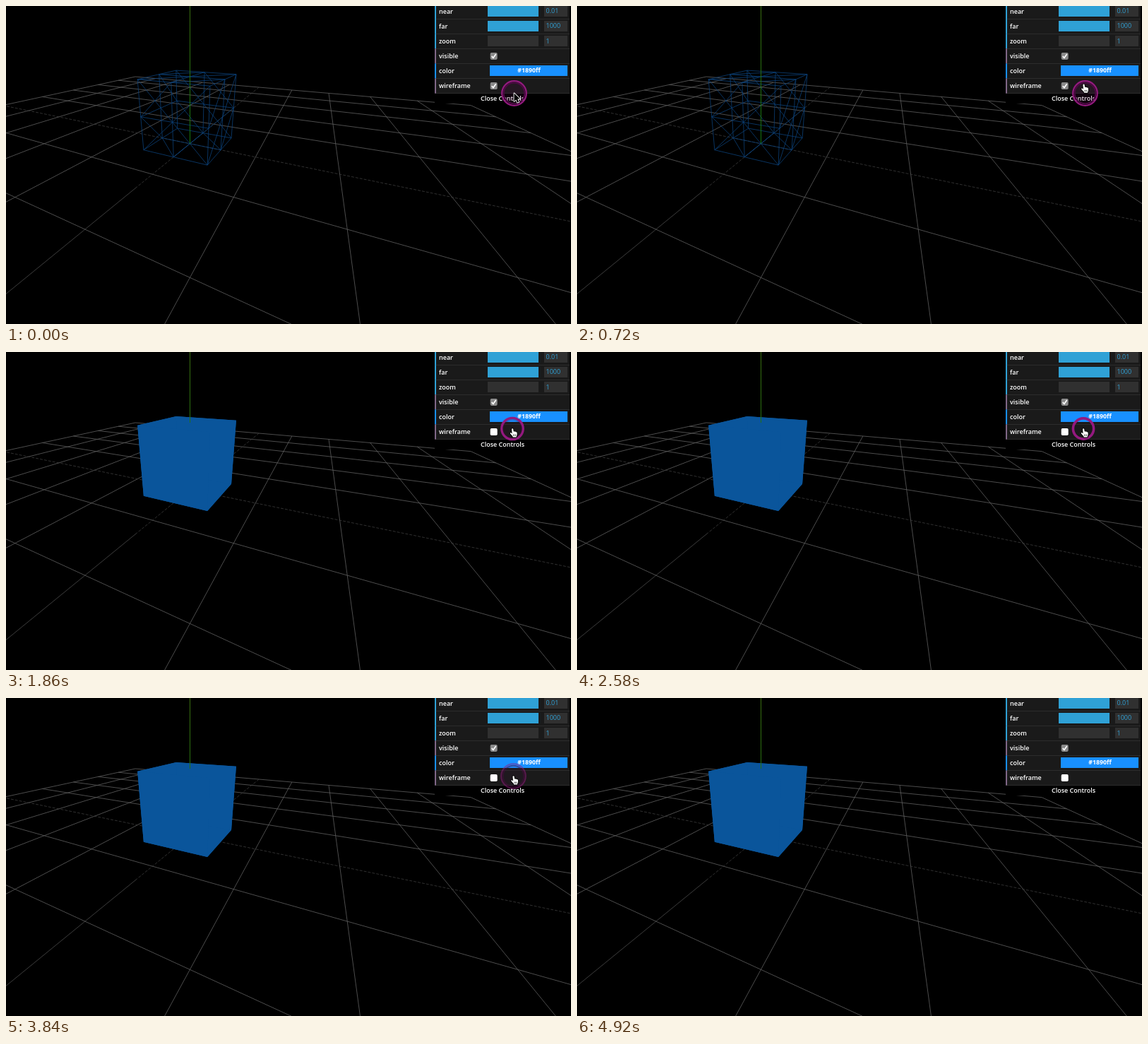
Write an HTML page with a canvas that moves like this. It is 800 by 450 pixels and loops after 5220 ms.

```html
<!DOCTYPE html>
<html lang="en">
<head>
<meta charset="utf-8">
<title>Wireframe toggle</title>
<style>
html, body { margin: 0; width: 100%; height: 100%; overflow: hidden; background: #000; }
canvas { display: block; width: 800px; height: 450px; }
</style>
</head>
<body>
<canvas id="stage" width="800" height="450"></canvas>
<script>
const ctx = document.getElementById('stage').getContext('2d');
const LOOP = 5220, STEP = 60;
const FONT = '"Open Sans", "Noto Sans", sans-serif';
const SIDES = [-1, 1];

// Camera at (1.5, 1.5, 3) looking at the world origin
const CAM = { x: 260.4, y: 194.8, f: 339, dist: 1.5 * Math.sqrt(6) };
const NEAR = 0.05;

const mix = (a, b, k) => a.map((v, i) => v + (b[i] - v) * k);

function ease(t, from, to) {
  const k = Math.min(1, Math.max(0, (t - from) / (to - from)));
  return k * k * (3 - 2 * k);
}

function toView([x, y, z]) {
  return [
    (2 * x - z) / Math.sqrt(5),
    (-x + 5 * y - 2 * z) / Math.sqrt(30),
    CAM.dist - (x + y + 2 * z) / Math.sqrt(6)
  ];
}

function toScreen([x, y, d]) {
  return [CAM.x + CAM.f * x / d, CAM.y - CAM.f * y / d];
}

const project = p => toScreen(toView(p));
const clip = (a, b) => mix(a, b, (NEAR - a[2]) / (b[2] - a[2]));

function addLine(p, q) {
  let a = toView(p), b = toView(q);
  if (a[2] < NEAR && b[2] < NEAR) return;
  if (a[2] < NEAR) a = clip(a, b);
  else if (b[2] < NEAR) b = clip(b, a);
  ctx.moveTo(...toScreen(a));
  ctx.lineTo(...toScreen(b));
}

function strokeLines(lines, color, dash = []) {
  ctx.strokeStyle = color;
  ctx.lineWidth = 0.8;
  ctx.setLineDash(dash);
  ctx.beginPath();
  lines.forEach(l => addLine(...l));
  ctx.stroke();
  ctx.setLineDash([]);
}

const gridLines = [];
for (let i = -5; i <= 5; i++) {
  if (i) gridLines.push([[i, 0, -5], [i, 0, 5]], [[-5, 0, i], [5, 0, i]]);
}

// Unit cube on the ground; w runs along the axis, u and v across it, all in -1..1
function cubePoint(axis, w, u, v) {
  const p = [];
  p[axis] = w / 2;
  p[(axis + 1) % 3] = u / 2;
  p[(axis + 2) % 3] = v / 2;
  p[1] += 0.5;
  return p;
}

// Edges and midlines, then one diagonal in each quarter of each face
const wire = [], faces = [];
for (let axis = 0; axis < 3; axis++) {
  for (let u = -1; u <= 1; u++) {
    for (let v = -1; v <= 1; v++) {
      if (u || v) wire.push(SIDES.map(w => cubePoint(axis, w, u, v)));
    }
  }
  for (const side of SIDES) {
    const slope = axis === 2 ? side : -side;
    for (const u of SIDES) {
      for (const v of SIDES) {
        const ends = u * v === slope ? [[0, 0], [u, v]] : [[u, 0], [0, v]];
        wire.push(ends.map(e => cubePoint(axis, side, ...e)));
      }
    }
    faces.push([[-1, -1], [1, -1], [1, 1], [-1, 1]].map(c => project(cubePoint(axis, side, ...c))));
  }
}

function drawScene(solid) {
  strokeLines(gridLines, '#606060');
  strokeLines([[[-5, 0, 0], [5, 0, 0]], [[0, 0, -5], [0, 0, 1.3]]], '#3c3c3c', [4, 2]);
  strokeLines([[[0, 0, 1.3], [0, 0, 5]]], '#4c4c4c');

  if (solid) {
    ctx.fillStyle = '#0a559b';
    for (const face of faces) {
      ctx.beginPath();
      face.forEach(p => ctx.lineTo(...p));
      ctx.fill();
    }
  } else {
    strokeLines(wire, '#0c4078');
  }
  const base = project([0, solid ? 1 : 0, 0])[1];
  const green = ctx.createLinearGradient(0, 0, 0, 195);
  green.addColorStop(0, '#3a6c10');
  green.addColorStop(1, '#147610');
  ctx.fillStyle = green;
  ctx.fillRect(260, 0, 1, base);
}

function box(x, y, w, h, color) {
  ctx.fillStyle = color;
  ctx.fillRect(x, y, w, h);
}

function text(str, x, y, color = '#fff', size = 9, weight = 600) {
  ctx.font = `${weight} ${size}px ${FONT}`;
  ctx.fillStyle = color;
  ctx.fillText(str, x, y);
}

function checkbox(y, on) {
  ctx.fillStyle = on ? '#8a8a8a' : '#fff';
  ctx.beginPath();
  ctx.roundRect(685.7, y - 5, 10, 10, 1.8);
  ctx.fill();
  if (!on) return;
  ctx.strokeStyle = '#fff';
  ctx.lineWidth = 1.7;
  ctx.beginPath();
  ctx.moveTo(687.8, y + 0.2);
  ctx.lineTo(689.9, y + 2.5);
  ctx.lineTo(693.7, y - 2.8);
  ctx.stroke();
}

function drawPanel(solid, hoverClose) {
  const BLUE = '#2fa1d6', FIELD = '#303030', MAUVE = '#806787', PICK = '#1890ff';
  const rows = [
    { name: 'near', edge: BLUE, value: '0.01', bar: BLUE },
    { name: 'far', edge: BLUE, value: '1000', bar: BLUE },
    { name: 'zoom', edge: BLUE, value: '1', bar: FIELD },
    { name: 'visible', edge: MAUVE, check: true, on: true },
    { name: 'color', edge: PICK, swatch: PICK },
    { name: 'wireframe', edge: MAUVE, check: true, on: !solid }
  ];
  box(607, 0, 191, 124, '#1a1a1a');
  rows.forEach((row, i) => {
    const mid = 7.5 + 21.1 * i, top = Math.round(mid - 7.5);
    box(607, Math.round(mid + 10), 191, 1, '#2c2c2c');
    box(607, mid - 10.5, 2, 21.1, row.edge);
    text(row.name, 613, mid + 3.2);
    if (row.value) {
      box(682, top, 72, 15, row.bar);
      box(762, top, 33, 15, FIELD);
      text(row.value, 764.5, mid + 2.8, BLUE, 9, 400);
    }
    if (row.check) checkbox(mid + 0.1, row.on);
    if (row.swatch) {
      box(685, top, 110, 15, row.swatch);
      ctx.textAlign = 'center';
      text(row.swatch, 740.5, mid + 2.4, '#fff', 8.8, 700);
      ctx.textAlign = 'left';
    }
  });
  box(607, 124, 191, 14, hoverClose ? '#111' : '#000');
  text('Close Controls', 672, 134.2);
}

// Resting places of the pointer tip
const CLOSE = [719.5, 123.5], TOGGLE = [717, 108.5], LEAVE = [736.5, 136.5];

function place(t, from, to) {
  return mix(mix(CLOSE, TOGGLE, ease(t, from, to)), LEAVE, ease(t, 3780, 4140));
}

function circle(x, y, r, width, color) {
  ctx.beginPath();
  ctx.arc(x, y, r, 0, 7);
  ctx.lineWidth = width;
  ctx.strokeStyle = color;
  ctx.stroke();
}

function drawRing(t) {
  const [x, y] = place(t, 720, 1080);
  const again = t > 3720;
  const calm = again ? 0 : ease(t, 1320, 2100);
  const r = 17.3 - 2.7 * calm;
  ctx.globalAlpha = again
    ? ease(t, 3720, 3960) * (1 - ease(t, 4740, 4920))
    : 1 - ease(t, 2580, 3000);
  circle(x, y, r, 2.2 + 1.4 * calm, '#94197f');
  ctx.globalAlpha *= 1 - calm;
  circle(x, y, r - 2.4, 2, '#4c0a43');
  ctx.fillStyle = 'rgba(100,10,90,.15)';
  ctx.fill();
  ctx.globalAlpha = 1;
}

const ARROW = new Path2D('M0 0V11.4L2.7 8.9L4.6 13.2L6.7 12.3L4.8 8.1H8.2Z');
const HAND = new Path2D('M-1 1Q-1 -.3 .1 -.3Q1.2 -.3 1.3 1L1.7 4.1Q2.6 3.3 3.5 4.3Q4.5 3.7 5.2 4.8Q6.6 4.5 6.6 6.1V8.3Q6.5 9.8 5.7 10.8V12H.5V11Q-1.4 8.9 -3.2 6.8Q-3.4 5.3 -1.9 5.7L-.4 7Z');
const FINGERS = new Path2D('M1.4 8V10.4M3 8V10.4M4.6 8V10.4');

function drawPointer(t, [x, y]) {
  const hand = t >= 660;
  const shape = hand ? HAND : ARROW;
  ctx.save();
  ctx.globalAlpha = 1 - ease(t, 4740, 4920);
  ctx.translate(x, y);
  ctx.lineJoin = 'round';
  ctx.lineWidth = 1.8;
  ctx.strokeStyle = hand ? '#000' : '#fff';
  ctx.fillStyle = hand ? '#fff' : '#000';
  ctx.stroke(shape);
  ctx.fill(shape);
  if (hand) {
    ctx.lineWidth = 0.6;
    ctx.stroke(FINGERS);
  }
  ctx.restore();
}

function draw(t) {
  const solid = (t >= 1740 && t < 2640) || t >= 3840;
  const tip = place(t, 480, 800);
  box(0, 0, 800, 450, '#000');
  drawScene(solid);
  drawPanel(solid, tip[1] > 125 && t < 4860);
  drawRing(t);
  drawPointer(t, tip);
}

const start = performance.now();
function tick() {
  const t = (performance.now() - start) % LOOP;
  draw(Math.floor(t / STEP) * STEP);
  requestAnimationFrame(tick);
}
tick();
</script>
</body>
</html>
```
